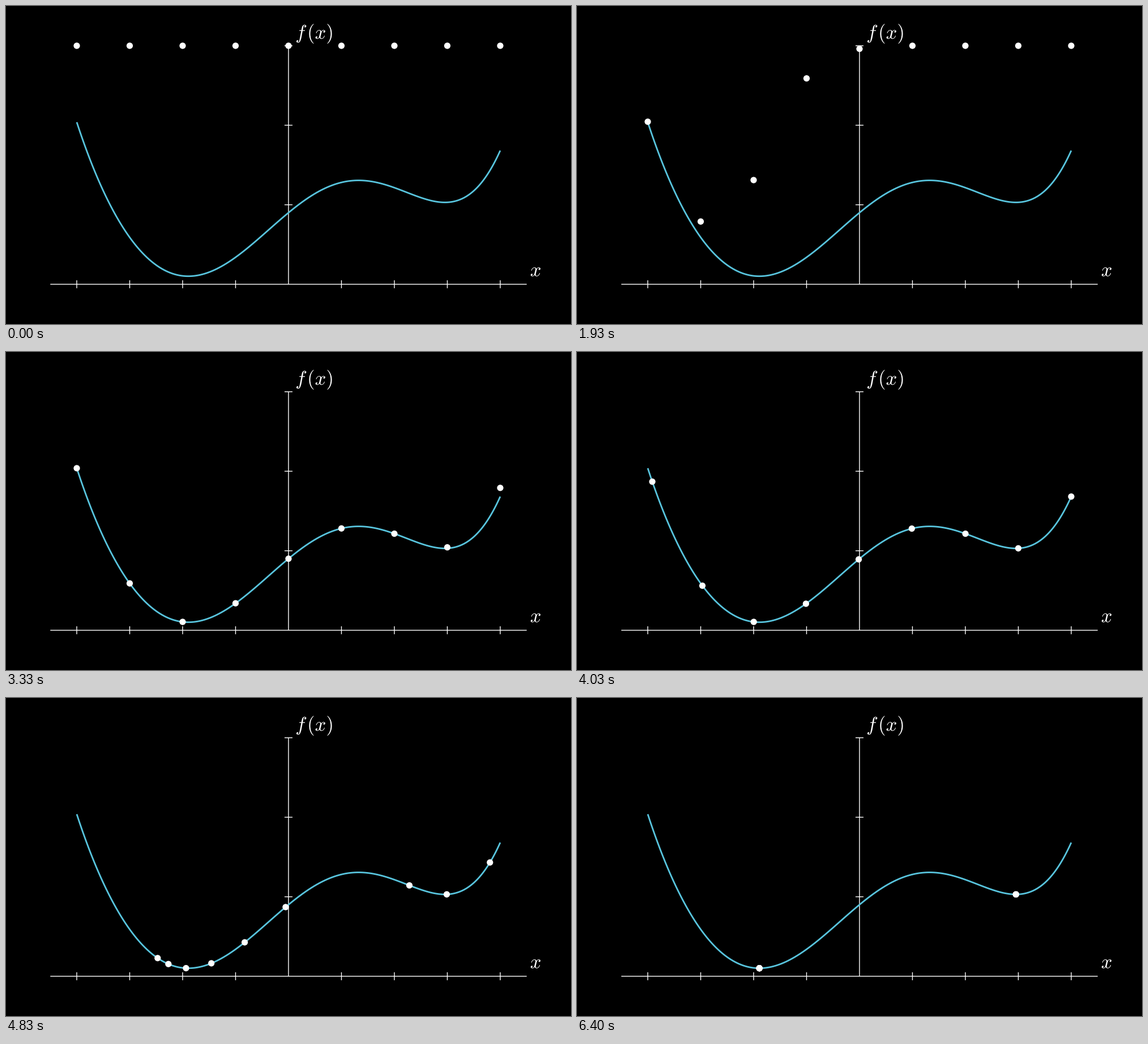
These frames come from a looping animation (998 px wide and 561 px high, 8130 ms). A matplotlib script:

```python
import numpy as np
import matplotlib.pyplot as plt
from matplotlib.animation import FuncAnimation
from matplotlib.collections import LineCollection
from matplotlib.patches import Circle, PathPatch
from matplotlib.textpath import TextPath
from matplotlib.transforms import Affine2D

plt.rcParams.update({"path.snap": False, "mathtext.fontset": "cm",
                     "path.simplify": False, "toolbar": "None"})

W, H, DPI = 998, 561, 64
PT = 72 / DPI                # points per pixel
UNIT = H / 8                 # pixels per scene unit
X0, Y0 = W / 2, H / 2 + 3 * UNIT
XS, YS = UNIT * 4 / 3, UNIT * 2
FPS, LOOP, STEP = 30, 8130, 15
EM = 34.9


def f(x):
    return 0.9 + 0.5 * np.sin(x) + 0.05 * x - 0.1 * x**2 + 0.01 * x**4


def minimum(x):
    """Newton's method on the slope of f."""
    for _ in range(20):
        slope = 0.5 * np.cos(x) + 0.05 - 0.2 * x + 0.04 * x**3
        bend = -0.5 * np.sin(x) - 0.2 + 0.12 * x**2
        x = x - slope / bend
    return x


def px(x):
    return X0 + x * XS


def py(y):
    return Y0 - y * YS


def smooth(t):
    """Normalised sigmoid easing from 0 to 1."""
    t = np.clip(t, 0, 1)
    low = 1 / (1 + np.exp(5))
    return (1 / (1 + np.exp(-10 * (t - 0.5))) - low) / (1 - 2 * low)


fig = plt.figure(figsize=(W / DPI, H / DPI), dpi=DPI, facecolor="black")
ax = fig.add_axes([0, 0, 1, 1])
ax.set_xlim(0, W)
ax.set_ylim(H, 0)
ax.axis("off")

# axes and ticks
tick = 0.1 * UNIT
lines = [[(px(-4.5), Y0), (px(4.5), Y0)], [(X0, Y0), (X0, py(3))]]
lines += [[(px(i), Y0 - tick), (px(i), Y0 + tick)] for i in range(-4, 5) if i]
lines += [[(X0 - tick, py(i)), (X0 + tick, py(i))] for i in (1, 2, 3)]
ax.add_collection(LineCollection(lines, colors="white", capstyle="butt",
                                 linewidths=0.02 * UNIT * PT, zorder=1))

# curve
xs = np.linspace(-4, 4, 400)
ax.plot(px(xs), py(f(xs)), color="#58C4DD", lw=0.04 * UNIT * PT,
        solid_capstyle="butt", zorder=2)


def label(text, left, mid):
    """Place math text by the left edge and middle of its ink."""
    path = TextPath((0, 0), text, size=EM)
    box = path.get_extents()
    move = Affine2D().translate(-box.x0, -(box.y0 + box.y1) / 2)
    move.scale(1, -1).translate(left, mid)
    ax.add_patch(PathPatch(move.transform_path(path), fc="white", lw=0, zorder=3))


label("$f$", 513, 49)
label("$(x)$", 535.4, 49)
label("$x$", 926.8, 469)

# dots fall onto the curve, then slide to the nearest minimum
start = np.arange(-4.0, 5.0)
order = np.arange(len(start))
goal = np.where(start < 1.5, minimum(-1.9), minimum(3.0))

FALL_AT, FALL_LAG = 1.0, 0.2
SLIDE_AT, SLIDE_LAG = 109 / FPS, 0.03
SLIDE = 2.5 / (1 + SLIDE_LAG * order[-1])

dots = [ax.add_patch(Circle((px(x), py(3)), 0.08 * UNIT, fc="white", lw=0, zorder=4))
        for x in start]


def update(k):
    n = int((k + 0.5) * STEP * FPS / 1000 + 0.25)
    t = n / FPS
    fall = smooth(t - FALL_AT - FALL_LAG * order)
    slide = smooth((t - SLIDE_AT) / SLIDE - SLIDE_LAG * order)
    x = start + (goal - start) * slide
    y = 3 + (f(x) - 3) * fall
    for dot, cx, cy in zip(dots, px(x), py(y)):
        dot.center = cx, cy
    return dots


anim = FuncAnimation(fig, update, frames=LOOP // STEP, interval=STEP,
                     init_func=lambda: update(0), repeat=True, repeat_delay=0)
plt.show()
```
